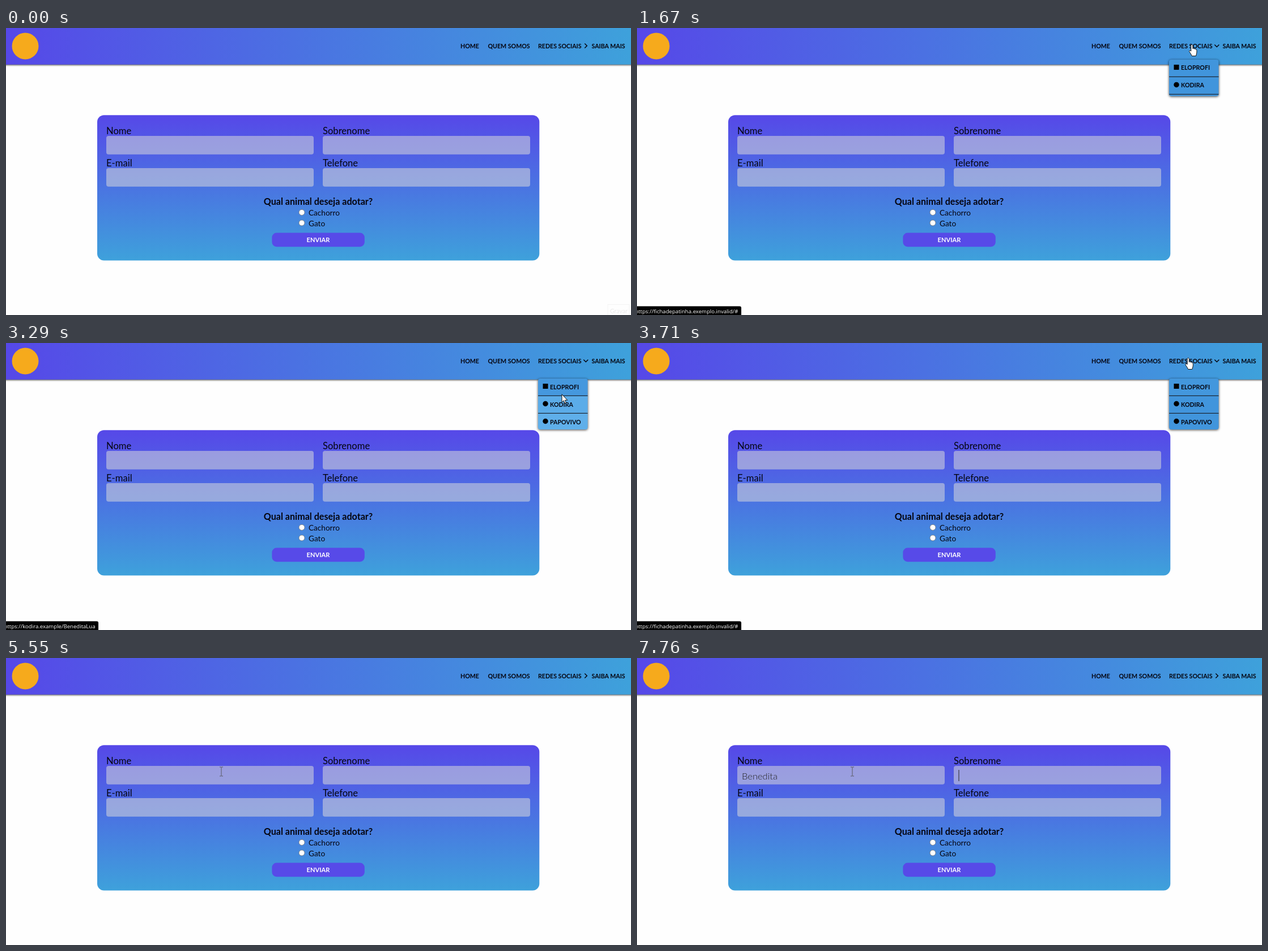
Recreate the animation shown at these times as an HTML page. Size 1103 px wide and 508 px high, loop 8 s.

```html
<!DOCTYPE html>
<html lang="pt">
<head>
<meta charset="utf-8">
<title>Formulário de adoção</title>
<style>
  html, body { margin: 0; height: 100%; overflow: hidden; background: #fefefe; }
  svg { display: block; width: 100%; height: 100%; }
  text { font-family: Lato, sans-serif; fill: #050510; white-space: pre; }
  .label { font-size: 16.6px; }
  .option { font-size: 13.6px; }
  .nav { font-size: 10.65px; font-weight: 700; }
  .header { filter: drop-shadow(0 1px 1.6px #000b); }
  #menu { filter: drop-shadow(0 1px 2px #000b); }
  .field { fill: #dcdcdc; fill-opacity: .53; }
  #typed { font-size: 16.5px; font-weight: 300; fill: #222; }
  #url { font: 9.6px "Open Sans", sans-serif; fill: #fff; }
  #faint { fill: none; stroke: #f3f3f3; }
  #faint text { font-size: 10.5px; fill: #e9e9e9; stroke: none; }
</style>
</head>
<body>
<svg viewBox="0 0 1103 508" preserveAspectRatio="none">
  <defs>
    <linearGradient id="across"><stop stop-color="#5648e8"/><stop offset="1" stop-color="#3ea1db"/></linearGradient>
    <linearGradient id="down" x2="0" y2="1"><stop stop-color="#5648e8"/><stop offset="1" stop-color="#3ea1db"/></linearGradient>
    <clipPath id="reveal"><rect id="window" x="939" width="87.5" rx="4"/></clipPath>
  </defs>

  <rect class="header" x="-8" y="-8" width="1119" height="72.7" fill="#666"/>
  <rect width="1103" height="64.7" fill="url(#across)"/>
  <circle cx="34" cy="32" r="23.5" fill="#f6aa1c"/>
  <g class="nav">
    <text x="802" y="36">HOME</text>
    <text x="850.5" y="36">QUEM SOMOS</text>
    <text x="939" y="36">REDES SOCIAIS</text>
    <text x="1033.5" y="36">SAIBA MAIS</text>
  </g>
  <path id="chevron" d="M-2-4 2 0-2 4" fill="none" stroke="#050510" stroke-width="1.5"/>

  <rect x="161" y="154.3" width="780.3" height="257.2" rx="12" fill="url(#down)"/>
  <g id="fields"></g>
  <text id="typed" x="185" y="214.5"></text>
  <rect id="caret" y="198" width="1" height="20" fill="#222"/>
  <text x="551" y="313.3" text-anchor="middle" font-size="16.1" font-weight="700">Qual animal deseja adotar?</text>
  <g fill="#fff" stroke="#767676" stroke-width=".8">
    <circle cx="522" cy="326.4" r="5"/>
    <circle cx="522" cy="345" r="5"/>
  </g>
  <text class="option" x="534" y="332">Cachorro</text>
  <text class="option" x="534" y="350.8">Gato</text>
  <rect x="469.4" y="362.6" width="163.4" height="24.6" rx="8" fill="#574ae8"/>
  <text x="551" y="379" text-anchor="middle" font-size="11.1" font-weight="700" style="fill:#fff">ENVIAR</text>

  <g id="menu"><g clip-path="url(#reveal)"><g id="items"></g></g></g>

  <g id="status">
    <path id="bar"/>
    <text id="url" x="-3.5" y="504.5"></text>
  </g>
  <g id="faint">
    <rect x="1062" y="489.5" width="38" height="24"/>
    <text x="1066" y="505">Gravar</text>
  </g>
  <path id="cursor" stroke-linejoin="round"/>
</svg>
<script>
const LOOP = 8000, OPEN = 1390, CLOSE = 3840, SLIDE = 600;
const MENU_TOP = 63, ROW = 31, FADE = 300;
const $ = id => document.getElementById(id);
const set = (node, attrs) => {
  for (const k in attrs) node.setAttribute(k, attrs[k]);
};
const show = (node, on) => { node.style.display = on ? '' : 'none'; };
const clamp = v => Math.min(1, Math.max(0, v));
const easeOut = v => 1 - (1 - clamp(v)) ** 2;

$('fields').innerHTML = [
  ['Nome', 177, 191], ['Sobrenome', 559, 191], ['E-mail', 177, 248], ['Telefone', 559, 248]
].map(([name, x, y]) => `<text class="label" x="${x}" y="${y - 3.2}">${name}</text>
  <rect class="field" x="${x}" y="${y}" width="366" height="32.8" rx="4"/>`).join('');

$('items').innerHTML = ['ELOPROFI', 'KODIRA', 'PAPOVIVO'].map((name, i) => `
  <g transform="translate(939 ${i * ROW})">
    <rect class="row" width="88" height="${ROW}"/>
    ${i < 2 ? '<rect y="29.8" width="88" height="1.4" fill="#1b2430"/>' : ''}
    ${i ? '<circle cx="13" cy="13.5" r="4.7"/>' : '<rect x="8.5" y="9" width="9" height="9"/>'}
    <text class="nav" x="21" y="18.5">${name}</text>
  </g>`).join('');
const rows = document.querySelectorAll('.row');

// Where the pointer is: time, x, y.
const stops = [
  [470, 1057, 487], [1230, 978, 31], [1900, 980, 28], [2150, 986, 72], [2400, 987, 84], [2470, 988, 99],
  [2800, 985, 136], [3100, 985, 136], [3290, 981, 91], [3600, 975, 26], [CLOSE, 970, 26],
  [4190, 664, 107.5], [4680, 381, 198], [5050, 380, 201]
];
function pointerAt(t) {
  const next = stops.findIndex(s => s[0] > t);
  if (next < 1) return stops.at(next).slice(1);
  const a = stops[next - 1], b = stops[next];
  const f = (t - a[0]) / (b[0] - a[0]);
  return [a[1] + (b[1] - a[1]) * f, a[2] + (b[2] - a[2]) * f];
}

const shapes = {
  arrow: { d: 'M0 0V14L3.2 11.2 5.4 16.2 7.6 15.2 5.4 10.4H9.8Z', fill: '#fff', stroke: '#111' },
  hand: {
    d: 'M-1.6 1.5Q0-.8 1.6 1.5V7.5Q3.5 6.3 4.4 8 6 7.3 6.7 8.8 8.6 8.5 8.6 10.5V14Q8.4 16.5 7 20.5H0Q-1.5 17-4.8 12.5-4.8 10.5-3 10.8L-1.6 12Z',
    fill: '#fff', stroke: '#111'
  },
  beam: { d: 'M-3-8H-.8L0-7.4.8-8H3M0-7.4V7.4M-3 8H-.8L0 7.4.8 8H3', fill: 'none', stroke: '#5a5a62' }
};

function pointerKind(x, y) {
  if (x < 543 && y > 191) return 'beam';
  const inRow = (y - MENU_TOP) % ROW;
  const onLink = y < MENU_TOP ? y > 22 && y < 42 : y < 156 && inRow > 4 && inRow < 27;
  return x > 939 && onLink ? 'hand' : 'arrow';
}

// Share of the last FADE ms that the pointer spent on a row.
function hover(t, row) {
  const samples = 30;
  let hits = 0;
  for (let i = 0; i < samples; i++) {
    const [x, y] = pointerAt(t - FADE * i / samples);
    if (x > 939 && Math.floor((y - MENU_TOP) / ROW) === row) hits++;
  }
  return t > OPEN ? hits / samples : 0;
}

const home = 'https://fichadepatinha.exemplo.invalid/#';
// Shown from, gone by, address.
const links = [
  [1370, 2320, home],
  [2170, 2560, 'https://www.eloprofi.example/in/benedita-ventana-de-luar-0000000/'],
  [2560, 3530, 'https://kodira.example/BeneditaLua'],
  [3380, 4400, home]
];

const word = 'Benedita';
const CLICK = 5020, TYPE = 5820, KEY = 170, TAB = 7760, BLINK = 530;

function drawMenu(t) {
  const open = easeOut((t - OPEN) / SLIDE) - easeOut((t - CLOSE) / SLIDE);
  const top = MENU_TOP - 25 * (1 - open);
  show($('menu'), open > .005);
  set($('window'), { y: top, height: 90 * open });
  set($('items'), { transform: `translate(0 ${top})` });
  rows.forEach((row, i) => {
    const h = hover(t, i);
    set(row, { fill: `rgb(${65 + 60 * h},${149 + 52 * h},${220 + 28 * h})` });
  });
  const turn = t >= OPEN && t < CLOSE ? 90 : 0;
  set($('chevron'), { transform: `translate(1023.3 31.5) rotate(${turn})` });
}

function drawStatus(t) {
  const link = links.filter(l => l[0] <= t).pop();
  const alpha = link ? clamp((link[1] - t) / 150) : 0;
  show($('status'), alpha > 0);
  if (!alpha) return;
  $('url').textContent = link[2];
  set($('url'), { 'fill-opacity': alpha });
  const width = $('url').getComputedTextLength() + 2;
  set($('bar'), { d: `M0 492.5H${width - 3}q3 0 3 3V508H0Z`, 'fill-opacity': alpha });
}

function drawTyping(t) {
  const typed = $('typed');
  const count = Math.min(word.length, Math.max(0, Math.floor((t - TYPE) / KEY) + 1));
  typed.textContent = word.slice(0, count);
  const lastAction = t >= TAB ? TAB : count ? TYPE + (count - 1) * KEY : CLICK;
  show($('caret'), t >= lastAction && t < lastAction + BLINK);
  set($('caret'), { x: t >= TAB ? 567.5 : 185 + typed.getComputedTextLength() });
}

function drawCursor(t) {
  const [x, y] = pointerAt(t);
  show($('cursor'), t >= stops[0][0]);
  set($('cursor'), { ...shapes[pointerKind(x, y)], transform: `translate(${x} ${y})` });
}

const start = performance.now();
function frame() {
  const t = (performance.now() - start) % LOOP;
  show($('faint'), t < 70);
  drawMenu(t);
  drawStatus(t);
  drawTyping(t);
  drawCursor(t);
  requestAnimationFrame(frame);
}
frame();
</script>
</body>
</html>
```
